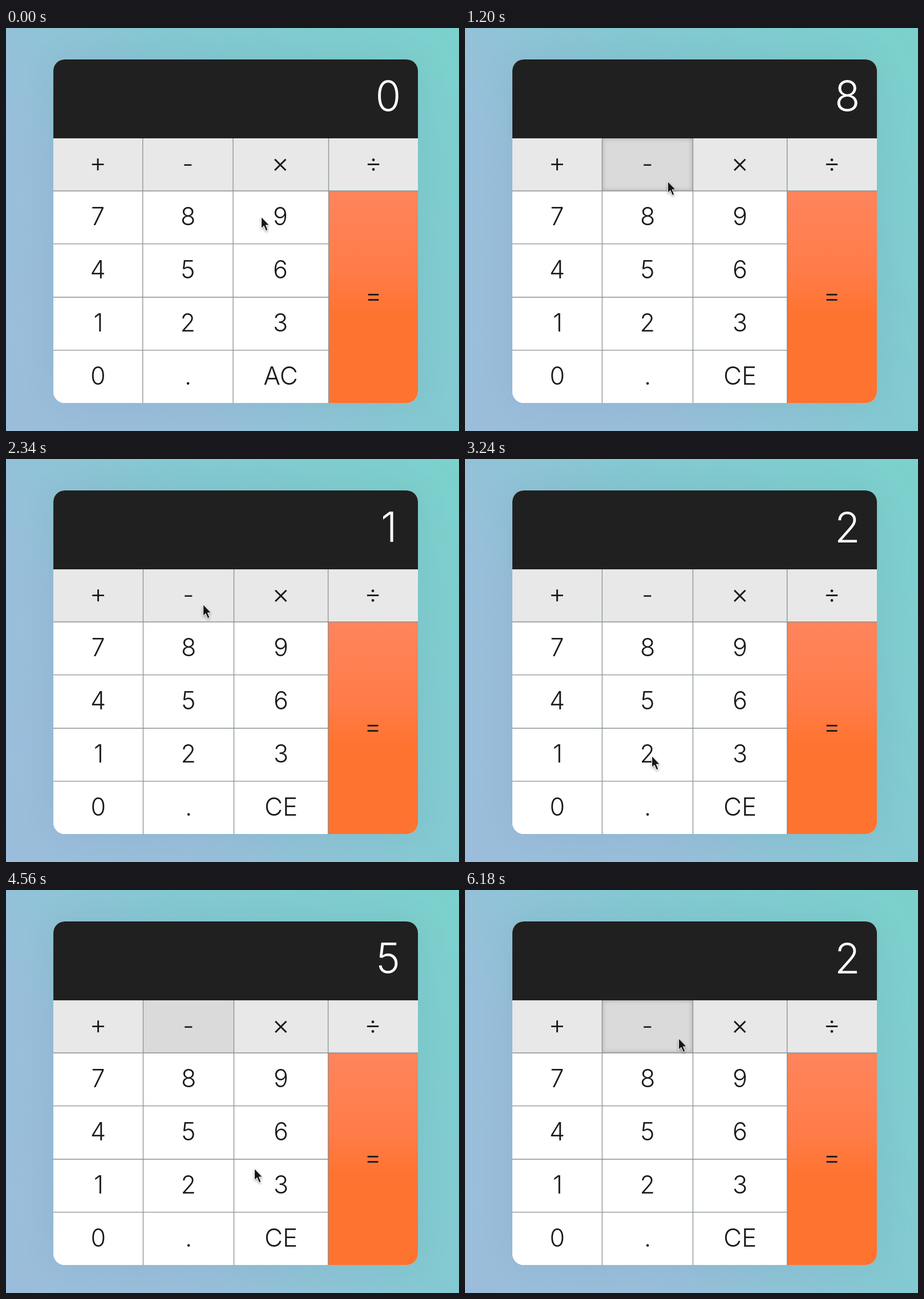
An HTML page that plays this animation: 794x705 px, repeating every 6240 ms.

```html
<!DOCTYPE html>
<html lang="en">
<head>
<meta charset="utf-8">
<title>Calculator</title>
<style>
  html, body { margin: 0; width: 100%; height: 100%; overflow: hidden; }
  body { position: relative; background: linear-gradient(236deg, #7bd1cc, #84c9d2 40%, #98bfda 70%, #9bbddb); }
  #calc {
    position: absolute; left: 83px; top: 55px; width: 639px; height: 601px;
    border-radius: 20px; overflow: hidden; background: #fff;
    box-shadow: 0 0 70px rgba(0, 20, 60, .06);
  }
  #calc div { position: absolute; background: #fff; }
  #calc .screen { left: 0; top: 0; width: 639px; height: 138px; background: #202020; }
  #calc .op { background: #e8e8e8; }
  #calc .on { background: #dadada; }
  #calc .equal { background: linear-gradient(#ff845c, #ff7c48 38%, #ff7330 58%); }
  #calc .held { box-shadow: inset 0 0 9px rgba(11, 11, 11, .25); }
  svg { position: absolute; left: 0; top: 0; }
  text { font-family: Inter, "Liberation Sans", sans-serif; font-weight: 340; fill: #1b1b1b; }
  #rules { fill: none; stroke: #8a9194; stroke-width: 1.3; }
  #arrow { filter: drop-shadow(0 2px 2px rgba(0, 0, 0, .35)); }
</style>
</head>
<body>
<div id="calc"><div class="screen"></div></div>
<svg width="794" height="705" viewBox="0 0 794 705">
  <path id="rules"/>
  <g id="labels"></g>
  <g id="cursor">
    <path id="arrow" d="M.5 1.5V21.5L5 17.3L8.6 25.8L12 24.4L8.4 16H14.4Z"
          fill="#161616" stroke="#fff" stroke-width="1" stroke-linejoin="round"/>
  </g>
</svg>
<script>
const LOOP = 6240, STEP = 60, LEFT = 83, TOP = 55;
const calc = document.getElementById('calc');
const rules = document.getElementById('rules');
const labels = document.getElementById('labels');
const cursor = document.getElementById('cursor');
const pen = document.createElement('canvas').getContext('2d');

const rows = [193, 285, 377.7, 471, 563.7, 656];
const rowMid = [239, 328.8, 421.8, 514.9, 607.5];
const layouts = {
  AC: { edges: [83, 239.7, 398, 565.5, 722], mids: [161, 319, 481, 644] },
  CE: { edges: [83, 240.4, 399.5, 564.6, 722], mids: [161.5, 320, 482, 643] }
};
const grid = ['+-×÷', '789=', '456', '123', ['0', '.', 'clear']];
const sizes = { '+': 46, '÷': 46, '=': 46, '×': 48, clear: 44 };

// Cursor stops: time, x, y
const path = [
  [0, 447, 329], [360, 332, 336], [600, 332, 334], [1020, 354, 266], [1260, 355, 267],
  [1680, 172, 520], [1860, 172, 520], [2340, 345, 253], [2520, 345, 253],
  [2940, 327, 518], [3240, 327, 518], [3720, 352, 262], [4020, 354, 264],
  [4560, 435, 486], [4740, 484, 522], [4980, 484, 522], [5460, 375, 274],
  [5640, 374, 258], [LOOP, 374, 258]
];

// Presses: start, end, key, resulting display
const presses = [
  [480, 600, '8', '8'], [1080, 1320, '-', '8'],
  [1740, 1860, '1', '1'], [2400, 2580, '-', '7'],
  [3000, 3120, '2', '2'], [3780, 4020, '-', '5'],
  [4800, 4920, '3', '3'], [5760, LOOP, '-', '2']
];

// Centres the visible ink of a glyph on a point.
function place(node, str, cx, cy, size) {
  pen.font = `340 ${size}px Inter, "Liberation Sans", sans-serif`;
  const m = pen.measureText(str);
  node.textContent = str;
  node.setAttribute('font-size', size);
  node.setAttribute('x', cx - (m.actualBoundingBoxRight - m.actualBoundingBoxLeft) / 2);
  node.setAttribute('y', cy + (m.actualBoundingBoxAscent - m.actualBoundingBoxDescent) / 2);
}

function addText() {
  return labels.appendChild(document.createElementNS('http://www.w3.org/2000/svg', 'text'));
}

const keys = grid.flatMap((line, row) => [...line].map((name, col) => {
  const box = calc.appendChild(document.createElement('div'));
  if (row === 0) box.className = 'op';
  if (name === '=') box.className = 'equal';
  return { name, row, col, box, text: addText() };
}));
const readout = addText();
readout.style.fill = '#fff';

function arrange(mode) {
  const { edges, mids } = layouts[mode];
  for (const { name, row, col, box, text } of keys) {
    const bottom = name === '=' ? rows[5] : rows[row + 1];
    Object.assign(box.style, {
      left: edges[col] - LEFT + 'px', top: rows[row] - TOP + 'px',
      width: edges[col + 1] - edges[col] + 'px', height: bottom - rows[row] + 'px'
    });
    const cy = { '=': 471, '.': 621 }[name] || rowMid[row];
    place(text, name === 'clear' ? mode : name, mids[col], cy, sizes[name] || 43);
  }
  const across = rows.slice(1, 5).map((y, i) => `M${LEFT} ${y}H${edges[i ? 3 : 4]}`);
  const down = edges.slice(1, 4).map(x => `M${x} ${rows[0]}V${rows[5]}`);
  rules.setAttribute('d', across.concat(down).join(''));
}

function cursorAt(t) {
  const i = path.findIndex(p => p[0] > t);
  const [t0, x0, y0] = path[i - 1], [t1, x1, y1] = path[i];
  const u = (t - t0) / (t1 - t0), e = u * u * (3 - 2 * u);
  return [x0 + (x1 - x0) * e, y0 + (y1 - y0) * e];
}

let shownMode, shownValue;
function render(t) {
  const last = presses.filter(p => p[0] <= t).pop();
  const mode = last ? 'CE' : 'AC';
  const value = last ? last[3] : '0';
  if (mode !== shownMode) arrange(shownMode = mode);
  if (value !== shownValue) place(readout, shownValue = value, 670, 118.5, 72.5);
  for (const { name, box } of keys) {
    const latest = !!last && last[2] === name;
    box.classList.toggle('held', latest && t < last[1]);
    box.classList.toggle('on', latest && name === '-');
  }
  cursor.setAttribute('transform', `translate(${cursorAt(t)})`);
}

const start = performance.now();
function tick() {
  const t = (performance.now() - start) % LOOP;
  render(Math.floor(t / STEP) * STEP);
  requestAnimationFrame(tick);
}
tick();
</script>
</body>
</html>
```
